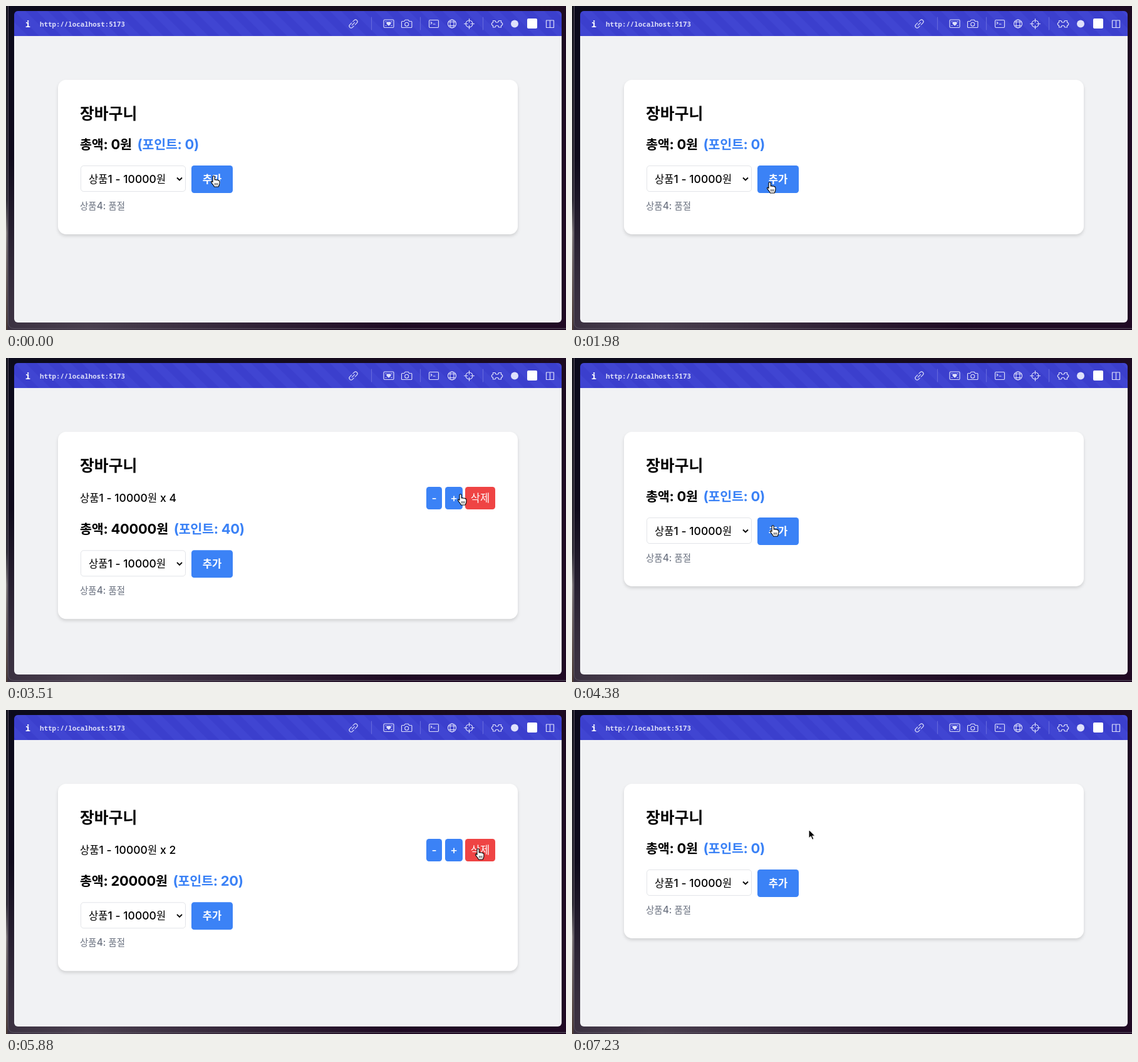
Animation, 894 px wide and 518 px high, one loop 7.29 s. Source, as an HTML page:

```html
<!DOCTYPE html>
<html lang="ko">
<head>
<meta charset="utf-8">
<style>
html, body { margin: 0; width: 100%; height: 100%; overflow: hidden; background: #150a1b; }
svg { display: block; font-family: Inter, "Noto Sans CJK KR", "Noto Sans CJK", sans-serif; }
.ko { font-family: "Noto Sans CJK KR", "Noto Sans CJK", sans-serif; font-size: 94%; }
.mono { font-family: "Noto Sans Mono", "DejaVu Sans Mono", monospace; }
#total { letter-spacing: -.3px; }
#card { filter: drop-shadow(0 3px 2.5px rgb(0 0 0 / .13)); }
#icons { fill: none; stroke: #dfe1fb; stroke-width: 1.15; stroke-linecap: round; stroke-linejoin: round; }
</style>
</head>
<body>
<svg width="894" height="518" viewBox="0 0 894 518">
  <defs>
    <linearGradient id="desk" x2="1" y2=".5">
      <stop offset="0" stop-color="#0b0b1c"/><stop offset=".45" stop-color="#150b1c"/><stop offset="1" stop-color="#200a24"/>
    </linearGradient>
    <radialGradient id="glow" cx=".15" cy="1" r=".55">
      <stop offset="0" stop-color="#6d6270" stop-opacity=".6"/><stop offset="1" stop-color="#6d6270" stop-opacity="0"/>
    </radialGradient>
    <linearGradient id="edge" x2="0" y2="1">
      <stop offset="0" stop-color="#15151d"/><stop offset=".6" stop-color="#34313a"/><stop offset=".7" stop-color="#8b8586"/><stop offset="1" stop-color="#4a3a35"/>
    </linearGradient>
    <pattern id="stripes" width="36" height="40" patternUnits="userSpaceOnUse" patternTransform="translate(13 8)">
      <path d="M0 0H18L58 40H40ZM-36 0H-18L22 40H4Z" fill="#4a50dc"/>
    </pattern>
    <clipPath id="win"><rect x="13" y="8" width="874" height="498" rx="6"/></clipPath>
  </defs>

  <rect width="894" height="518" fill="url(#desk)"/>
  <rect width="894" height="518" fill="url(#glow)"/>
  <rect width="2.5" height="518" fill="url(#edge)"/>
  <path d="M3.5 0V506Q3.5 515.5 13 515.5H894" fill="none" stroke="#57505e"/>

  <g clip-path="url(#win)">
    <rect x="13" y="48" width="874" height="458" fill="#f1f2f4"/>
    <rect x="13" y="8" width="874" height="40" fill="#3b3fcd"/>
    <rect x="13" y="8" width="874" height="40" fill="url(#stripes)" opacity=".35"/>
  </g>
  <text class="mono" x="35" y="34" font-size="14" font-weight="700" fill="#fff" text-anchor="middle">i</text>
  <text class="mono" x="54" y="33" font-size="10.8" font-weight="600" fill="#dcdef9">http://localhost:5173</text>

  <g id="icons">
    <path d="M583.5 18V38M661.5 18V38M761.5 18V38" stroke="#6468dc"/>
    <path transform="translate(554.5 28.5) rotate(-45)" d="M-1-3H-5a3 3 0 0 0 0 6H-2M1 3H5a3 3 0 0 0 0-6H2M-3 0H3"/>
    <rect x="603" y="22" width="16" height="12.5" rx="1.5"/>
    <path d="M611 31l-3-3a1.7 1.7 0 0 1 3-1.5a1.7 1.7 0 0 1 3 1.5z" fill="#dfe1fb"/>
    <path d="M606 25h1M615 25h1M606 31.5h1M615 31.5h1"/>
    <path d="M632.5 24.5h3.2l1.5-2.3h5l1.5 2.3h3.2a1 1 0 0 1 1 1v8a1 1 0 0 1-1 1h-14.4a1 1 0 0 1-1-1v-8a1 1 0 0 1 1-1z"/>
    <circle cx="639.7" cy="29.2" r="3"/>
    <rect x="675.5" y="22.5" width="15" height="12" rx="1.5"/>
    <path d="M678 25.5l2 1.7-2 1.7M682 29h3"/>
    <circle cx="712" cy="28.5" r="6.5"/>
    <ellipse cx="712" cy="28.5" rx="3" ry="6.5"/>
    <path d="M706.5 25.5h11M706.5 31.5h11"/>
    <circle cx="739.5" cy="28.5" r="5.5"/>
    <path d="M739.5 20.5v5.5M739.5 31v5.5M731.5 28.5h5.5M742 28.5h5.5"/>
    <path d="M777.5 23.5h3.5a2.5 2.5 0 0 0 5.5 0h4v3a2.2 2.2 0 0 1 0 4.5v3h-4a2.5 2.5 0 0 0-5.5 0h-3.5v-3a2.2 2.2 0 0 1 0-4.5z"/>
    <circle cx="812" cy="28.5" r="6" fill="#dfe1fb" stroke="none"/>
    <rect x="832" y="20" width="16" height="16" rx="2" fill="#fff" stroke="none"/>
    <path d="M862.5 23h12v11.5h-12zM868.5 23v11.5"/>
  </g>

  <rect id="card" x="83" y="118" width="734" height="247" rx="13" fill="#fff"/>
  <g id="title"></g>
  <g id="row"></g>
  <g id="lower"><g id="total"></g><g id="form"></g></g>
  <g id="pointer"></g>
</svg>

<script>
const LOOP = 7290, STEP = 30, ROW = 52.3;
const BLUE = '#3b82f6', RED = '#ef4444';
const $ = id => document.getElementById(id);

// Hangul is set slightly smaller than the Latin letters beside it.
const hangul = str => str.replace(/[가-힣]+/g, '<tspan class="ko">$&</tspan>');
const text = (x, y, size, str, { weight = 450, fill = '#000', anchor = 'start' } = {}) =>
  `<text x="${x}" y="${y}" font-size="${size}" font-weight="${weight}" fill="${fill}" text-anchor="${anchor}">${hangul(str)}</text>`;

// Each button changes the number of items in the cart.
const add = { x: 296, y: 255, w: 66, h: 44, label: '추가', fill: BLUE, weight: 600, press: n => n + 1 };
const rowButtons = [
  { x: 671, w: 25, label: '-', fill: BLUE, press: n => n - 1 },
  { x: 701, w: 28, label: '+', fill: BLUE, press: n => n + 1 },
  { x: 733, w: 48, label: '삭제', fill: RED, press: () => 0 }
].map(b => ({ y: 206, h: 36, weight: 500, ...b }));

const drawButton = ({ x, y, w, h, label, fill, weight }) =>
  `<rect x="${x}" y="${y}" width="${w}" height="${h}" rx="4.4" fill="${fill}"/>` +
  text(x + w / 2, y + h / 2 + 6, 17.6, label, { weight, fill: '#fff', anchor: 'middle' });

const cursors = {
  arrow: `<path d="M0 0V14.2L3.3 11.2L5.6 16.4L8 15.3L5.8 10.3H10.3Z" fill="#000" stroke="#fff" stroke-width="1.1" stroke-linejoin="round"/>`,
  hand: `<path d="M-2 9.5V1.3a1.6 1.6 0 0 1 3.2 0V6q1.6-1 3 .3q1.7-.7 2.7.6q1.8-.2 2 1.6V12q-.4 2.5-1.8 5H.5q-1-2.5-3.5-5.2q-2.3-2.8-1-3.6q1.2-.4 2 1.3z" fill="#fff" stroke="#000" stroke-width="1.1" stroke-linejoin="round"/>
    <path d="M1.6 11v3.6M3.7 11v3.6M5.8 11v3.6" stroke="#000" stroke-width=".8"/>`,
  beam: `<path d="M-3-8Q0-8 0-6Q0-8 3-8M0-6V6M-3 8Q0 8 0 6Q0 8 3 8M-1.5 1.5H1.5" fill="none" stroke="#222" stroke-width="1.1"/>`
};

// Pointer moves: start, end, x, y. It rests in between.
const moves = [
  [0, 0, 332, 272], [420, 1110, 729.6, 228], [1200, 1320, 754, 222], [1470, 1920, 316, 282],
  [2220, 2640, 726, 218], [3780, 3900, 754, 222], [4080, 4380, 321, 268], [4950, 5160, 326, 338],
  [5700, 5880, 754, 222], [5970, 6150, 683, 224], [6540, 6960, 336, 274], [7110, 7230, 378, 191]
];
const clicks = [120, 1410, 2070, 2760, 3150, 3480, 4020, 4590, 5310, 6240, 6480];

const ease = u => u * u * (3 - 2 * u);

function locate(t) {
  const i = moves.findLastIndex(m => m[0] <= t);
  const [from, to, x1, y1] = moves[i], [, , x0, y0] = moves[Math.max(0, i - 1)];
  const e = t < to ? ease((t - from) / (to - from)) : 1;
  return [x0 + (x1 - x0) * e, y0 + (y1 - y0) * e];
}

const inside = (px, py, { x, y, w, h }) => px >= x && px <= x + w && py >= y && py <= y + h;

function buttonAt([x, y], n) {
  const buttons = n ? [{ ...add, y: add.y + ROW }, ...rowButtons] : [add];
  return buttons.find(b => inside(x, y, b));
}

const countAt = t => clicks.filter(c => c <= t)
  .reduce((n, c) => buttonAt(locate(c), n)?.press(n) ?? n, 0);

function cursorAt(point, n) {
  if (buttonAt(point, n)) return 'hand';
  const texts = n
    ? [{ x: 118, y: 207 + ROW, w: 260, h: 28 }, { x: 118, y: 212, w: 150, h: 24 }]
    : [{ x: 118, y: 207, w: 192, h: 28 }];
  return texts.some(box => inside(...point, box)) ? 'beam' : 'arrow';
}

$('title').innerHTML = text(118, 180.5, 26.4, '장바구니', { weight: 700 });
$('form').innerHTML =
  '<rect x="119.5" y="255.5" width="167" height="41" rx="4.4" fill="#fff" stroke="#e2e4e8"/>' +
  text(132, 283, 17.6, '상품1 - 10000원') +
  '<path d="M273 274.5l4 4 4-4" fill="none" stroke="#000" stroke-width="1.9"/>' +
  drawButton(add) +
  text(118, 324.7, 15.4, '상품4: 품절', { fill: '#6b7280' });

let shown = -1;
function showCart(n) {
  if (n === shown) return;
  shown = n;
  const shift = n ? ROW : 0;
  $('card').setAttribute('height', 247 + shift);
  $('lower').setAttribute('transform', `translate(0 ${shift})`);
  $('row').innerHTML = n
    ? text(118, 229.7, 17.6, `상품1 - 10000원 x ${n}`) + rowButtons.map(drawButton).join('')
    : '';
  const points = `<tspan dx="8.8" fill="${BLUE}">(포인트: ${n * 10})</tspan>`;
  $('total').innerHTML = text(118, 229, 22, `총액: ${n * 10000}원${points}`, { weight: 700 });
}

function draw(now) {
  const t = Math.floor(now % LOOP / STEP) * STEP;
  const n = countAt(t), point = locate(t);
  showCart(n);
  $('pointer').innerHTML = cursors[cursorAt(point, n)];
  $('pointer').setAttribute('transform', `translate(${point})`);
}

const start = performance.now();
function tick() {
  draw(performance.now() - start);
  requestAnimationFrame(tick);
}
tick();
</script>
</body>
</html>
```
